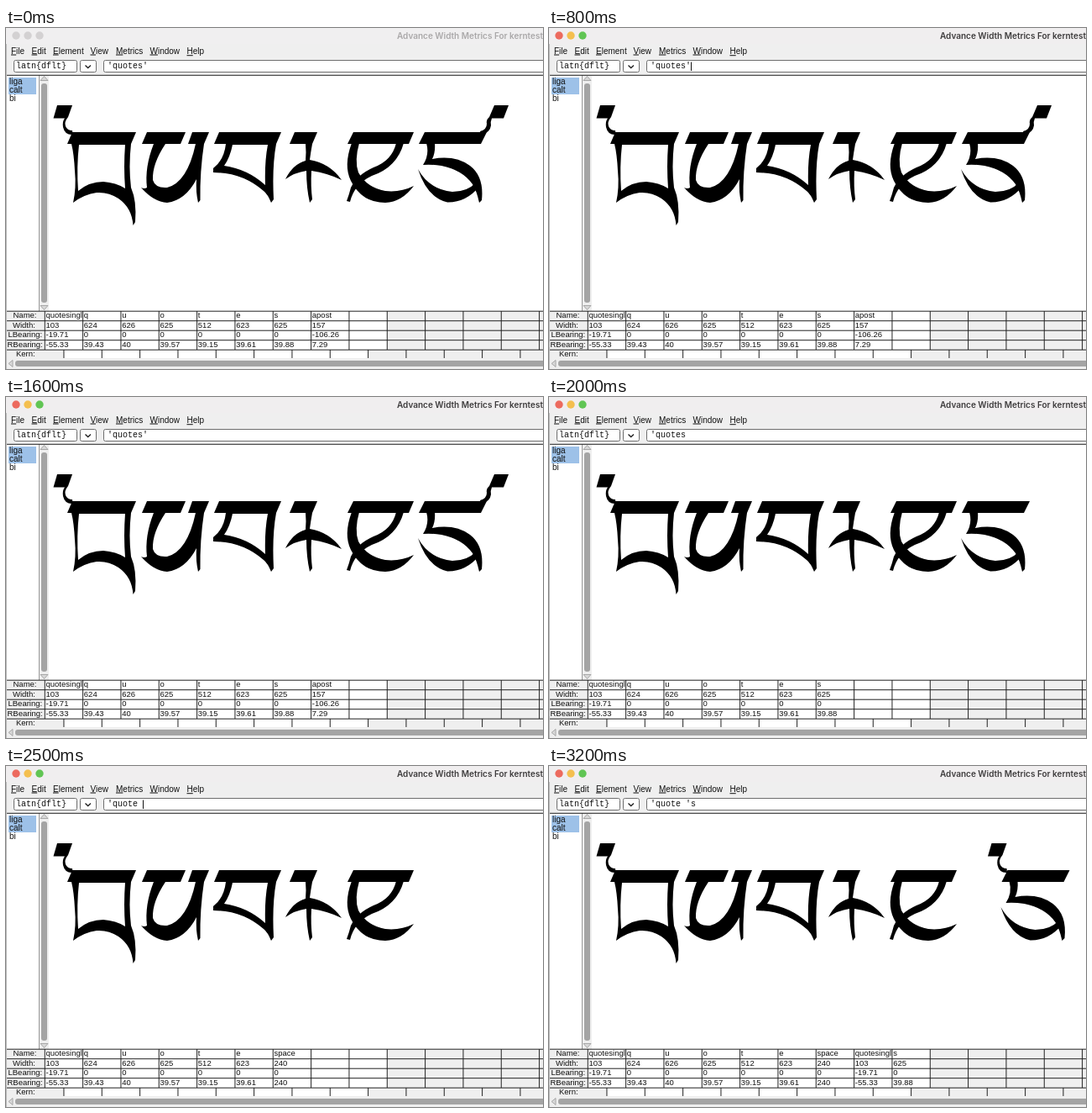
An HTML page that plays this animation: 640x406 px, repeating every 3.3 s.

```html
<!DOCTYPE html>
<html lang="en">
<head>
<meta charset="utf-8">
<title>Advance width metrics</title>
<style>
html, body { margin: 0; width: 100%; height: 100%; overflow: hidden; background: #efefef; }
svg { display: block; width: 100%; height: 100%; }
text { font-family: "Liberation Sans", Arial, sans-serif; font-size: 10px; fill: #111; white-space: pre; }
.title { font: 600 10px Inter, sans-serif; }
.mono { font-family: "Liberation Mono", "Courier New", monospace; }
.cell { font-size: 9.5px; }
.box { fill: #fff; stroke: #6e6e6e; }
.arrow { fill: #d8d8d8; stroke: #9a9a9a; stroke-width: .8; }
.thumb { fill: #a4a4a4; }
</style>
</head>
<body>
<svg id="stage" viewBox="0 0 640 406" xmlns="http://www.w3.org/2000/svg">
  <rect width="640" height="406" fill="#efefef"/>
  <rect id="bar" width="640" height="19" fill="#f0eeef"/>
  <g id="lights"></g>
  <text id="title" class="title" x="466" y="12.5">Advance Width Metrics For kerntest</text>
  <g id="menu"></g>

  <rect class="box" x="9.5" y="38.5" width="75" height="14" rx="2"/>
  <text class="mono" x="12" y="48">latn{dflt}</text>
  <rect class="box" x="88.5" y="38.5" width="19" height="14" rx="2"/>
  <path d="M94.5 44.5L97.7 47.5L101 44.5" fill="none" stroke="#222" stroke-width="1.4"/>
  <rect class="box" x="116.5" y="38.5" width="540" height="14" rx="2"/>
  <text id="typed" class="mono" x="121" y="48"></text>
  <path id="caret" d="M0 40.5V51" stroke="#111"/>

  <rect x="1" y="56" width="38" height="281" fill="#fff"/>
  <rect x="3" y="59" width="33" height="20" fill="#9dc1e8"/>
  <text x="4" y="67">liga</text>
  <text x="4" y="77">calt</text>
  <text x="4" y="87">bi</text>
  <path d="M39.5 56V337" stroke="#999"/>
  <path class="arrow" d="M41 62.5L45.5 57.5L50 62.5ZM41 330.5L45.5 335.5L50 330.5Z"/>
  <rect class="thumb" x="42" y="66" width="7" height="261" rx="3"/>
  <rect x="51" y="56" width="589" height="281" fill="#fff"/>
  <path d="M0 56.3H640" stroke="#222"/>
  <g id="word" fill="#000" fill-rule="evenodd"></g>

  <rect x="46" y="337" width="408" height="46" fill="#fff"/>
  <rect x="69" y="383" width="363" height="10" fill="#fff"/>
  <path id="grid" fill="none" stroke="#222"/>
  <g id="labels"></g>
  <g id="cells"></g>
  <rect y="394" width="640" height="12" fill="#efefef"/>
  <path class="arrow" d="M8 395.5L3 399.5L8 403.5Z"/>
  <rect class="thumb" x="11" y="396" width="640" height="7" rx="3"/>
  <path d="M.5 19V406" stroke="#bdbdbd"/>
</svg>
<script>
const LOOP = 3300, STEP = 45.33, ROW = 11.5;
const $ = id => document.getElementById(id);

function add(parent, tag, attrs, text) {
  const el = document.createElementNS("http://www.w3.org/2000/svg", tag);
  for (const key in attrs) el.setAttribute(key, attrs[key]);
  if (text !== undefined) el.textContent = text;
  parent.appendChild(el);
  return el;
}

// Outlines are placed where each letter stands in the first word.
const shapes = {
  quote: "M61 92H79L74 106Q69 112 71 117Q73 122 79 122L79.5 127Q70 127.5 68 118Q67 111 70 107.5H56.5Z",
  q: "M79 124H155L149 138Q146 165 149 190Q156 206 154 231L151.5 235Q150 214 134 203Q122 195 108 196Q93 198 80 208Q84 190 82 170Q81 150 78 138H73Z" +
     "M87 139Q84 165 86 194Q99 183 116 183Q131 184 142 191Q140 165 142 139Z",
  u: "M168 124H214L208 138H190Q174 162 175 181Q178 191 192 190Q216 184 226 138H217L222 124H242L236 138Q231 170 231.5 205L229 208Q226 195 227 180Q214 205 192 208Q176 207 161 190Q165 192 168 190Q165 166 176 138H162Z",
  o: "M254 124H328L322 138Q317 165 319 204L316 208Q312 198 307 194Q282 172 247 172L247 167Q260 157 262 138H248Z" +
     "M270 139Q267 154 260 164Q288 168 309 187Q308 160 312 139Z",
  t: "M344 124H371L365 138Q363 149 362 157Q386 161 400 181Q384 173 364 170Q363 188 365 204L362 208Q358 190 358 170Q344 172 333 180Q342 162 357 158Q358 148 357 138H338Z",
  e: ["M414 124H486L480 138H407Z",
      "M412 137Q402 164 411 182Q424 208 452 208Q472 207 486 188Q470 196 452 194Q430 190 420 172Q415 158 421 137Z",
      "M465 137Q460 158 438 166Q418 175 411 190Q409 198 406 206L410 207Q415 186 436 176Q466 166 474 137Z"],
  s: ["M499 124H573L566 138H492Z",
      "M501 137H511Q512 148 508 156Q535 151 553 164Q570 177 567 205L564 208Q561 194 556 186Q544 169 519 164Q506 162 497 163Q505 151 501 137Z",
      "M491 168Q504 192 532 195Q550 195 560 184L564 189Q548 208 526 207.5Q502 202 491 168Z"],
  apost: "M582 92H599L593 107.5H579Q577 112 578 116Q577 125 566 127L565 123Q573 121 573 114Q572 109 576 106Z"
};

const glyphs = {
  quote: ["quotesingl", "103", "-19.71", "-55.33"],
  q: ["q", "624", "0", "39.43"],
  u: ["u", "626", "0", "40"],
  o: ["o", "625", "0", "39.57"],
  t: ["t", "512", "0", "39.15"],
  e: ["e", "623", "0", "39.61"],
  s: ["s", "625", "0", "39.88"],
  apost: ["apost", "157", "-106.26", "7.29"],
  space: ["space", "240", "0", "240"]
};

const stem = ["quote", "q", "u", "o", "t", "e"];
const edits = [
  [0, "'quotes'", ["s", "apost"]],
  [1700, "'quotes", ["s"]],
  [2200, "'quote", []],
  [2400, "'quote ", ["space"]],
  [2800, "'quote '", ["space", "quote"]],
  [3000, "'quote 's", ["space", "quote", "s"]]
];
const caretOn = [[600, 1200], [1700, 1900], [2200, 3000]];
const rowY = row => 345.3 + row * ROW;

const lights = [12, 26, 40].map(x => add($("lights"), "circle", { cx: x, cy: 9, r: 4.7 }));

[["File", 6], ["Edit", 30.5], ["Element", 56], ["View", 100.5], ["Metrics", 131], ["Window", 171.5], ["Help", 215.5, 31.2]]
  .forEach(([word, x, y = 30.5]) => {
    const item = add($("menu"), "text", { x, y });
    add(item, "tspan", { "text-decoration": "underline" }, word[0]);
    add(item, "tspan", {}, word.slice(1));
  });

[["Name:", 8.5], ["Width:", 8], ["LBearing:", 2.5], ["RBearing:", 1.5], ["Kern:", 12]]
  .forEach(([label, x], row) => add($("labels"), "text", { class: "cell", x, y: rowY(row) }, label));

let lines = "";
for (let i = 0; i < 5; i++) lines += `M0 ${337.2 + i * ROW}H640`;
for (let i = 0; i < 14; i++) {
  const x = 46.3 + i * STEP;
  lines += `M${x} 337V383M${x + STEP / 2} 383V393`;
}
$("grid").setAttribute("d", lines);

let shown;
function showEdit(edit) {
  if (edit === shown) return;
  shown = edit;
  const [, text, tail] = edit;
  $("typed").textContent = text;
  $("caret").setAttribute("transform", `translate(${121.5 + text.length * 6} 0)`);
  $("word").replaceChildren();
  $("cells").replaceChildren();
  const spaced = tail.includes("space");
  stem.concat(tail).forEach((name, col) => {
    const shift = col < stem.length ? 0 : name === "quote" ? 466.5 : spaced ? 47.5 : 0;
    for (const d of [shapes[name] || []].flat())
      add($("word"), "path", { d, transform: `translate(${shift} 0)` });
    glyphs[name].forEach((value, row) =>
      add($("cells"), "text", { class: "cell", x: 47.5 + col * STEP, y: rowY(row) }, value));
  });
}

function draw(t) {
  const active = t >= 600;
  const colors = active ? ["#ec6a5e", "#f4bf4f", "#61c554"] : Array(3).fill("#d3d1d2");
  lights.forEach((dot, i) => dot.setAttribute("fill", colors[i]));
  $("title").style.fill = active ? "#3e3c3d" : "#aaa8a9";
  $("bar").setAttribute("fill", active ? "#f0eeef" : "#f0eff0");
  showEdit(edits.filter(edit => t >= edit[0]).pop());
  const on = caretOn.some(([from, to]) => t >= from && t < to);
  $("caret").setAttribute("visibility", on ? "visible" : "hidden");
}

const start = performance.now();
function tick() {
  draw((performance.now() - start) % LOOP);
  requestAnimationFrame(tick);
}
tick();
</script>
</body>
</html>
```
